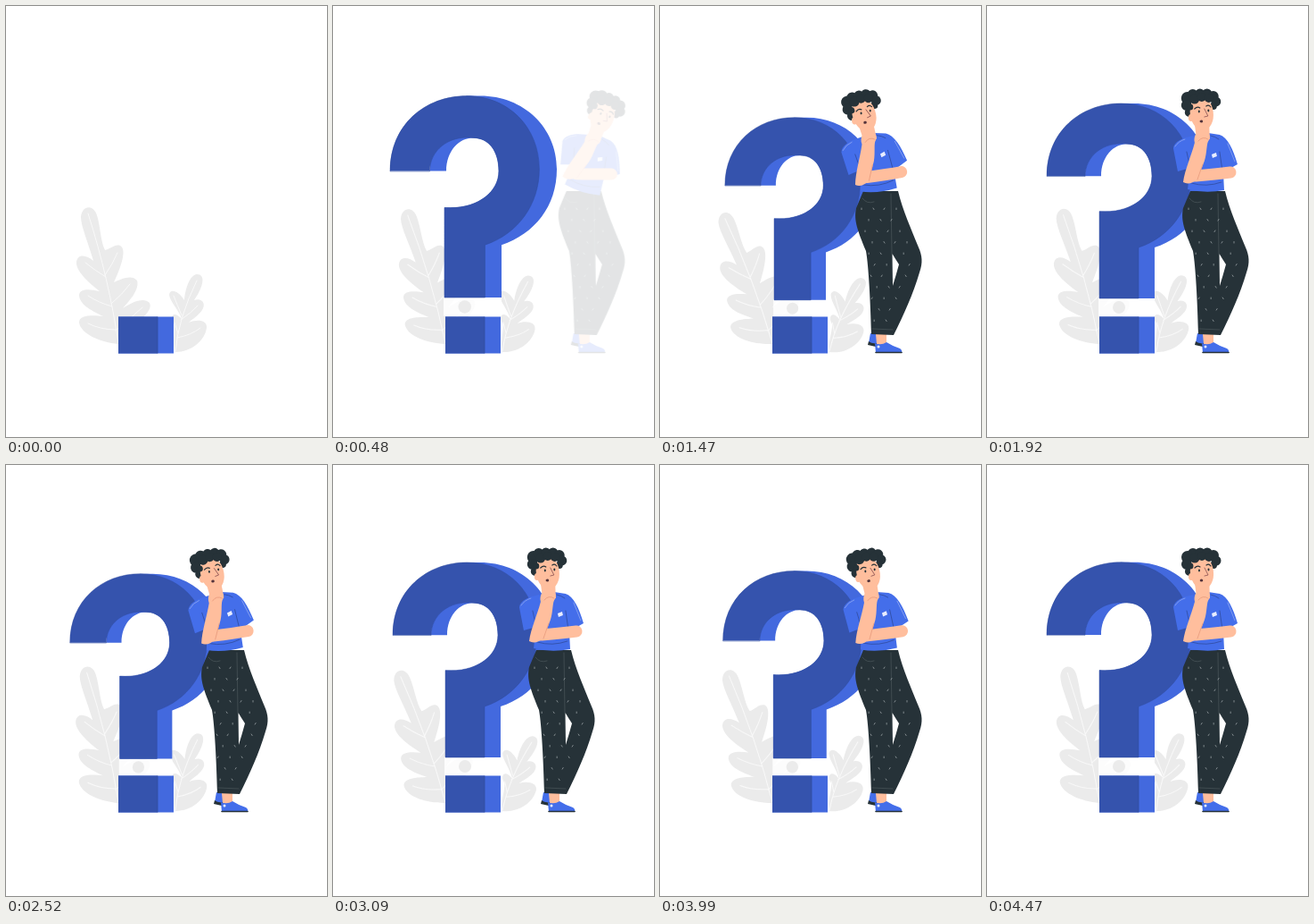
Write an HTML page with a canvas that moves like this. It is 360x482 px and loops after 4.5 s.

```html
<!DOCTYPE html>
<html lang="en">
<head>
<meta charset="utf-8">
<title>Question mark</title>
<style>
html, body { margin: 0; width: 100%; height: 100%; overflow: hidden; background: #fff; }
canvas { display: block; }
</style>
</head>
<body>
<canvas id="stage" width="360" height="482"></canvas>
<script>
const W = 360, H = 482, LOOP = 4500, STEP = 30;
const SWAY = 2340, PULSE = 1170, SETTLED = 885;
const BLUE = '#4369de', FRONT = '#3553ad', SHIRT = '#446eea', DARK = '#263238';
const SKIN = '#ffbe9d', SHADE = '#e79b7c', LEAF = '#ebebeb';
const stage = document.getElementById('stage').getContext('2d');
const layer = document.createElement('canvas');
layer.width = W;
layer.height = H;
const figure = layer.getContext('2d');

const clamp = v => Math.max(0, Math.min(1, v));
const rad = deg => deg * Math.PI / 180;

function fill(c, d, color) {
  c.fillStyle = color;
  c.fill(new Path2D(d));
}

function line(c, d, color, width = 1) {
  c.strokeStyle = color;
  c.lineWidth = width;
  c.lineCap = c.lineJoin = 'round';
  c.stroke(new Path2D(d));
}

function oval(c, x, y, rx, ry, color, turn = 0) {
  c.fillStyle = color;
  c.beginPath();
  c.ellipse(x, y, rx, ry, turn, 0, 7);
  c.fill();
}

function turned(c, x, y, deg, draw) {
  c.save();
  c.translate(x, y);
  c.rotate(rad(deg));
  c.translate(-x, -y);
  draw();
  c.restore();
}

function drawLeftLeaf(c) {
  fill(c, `M126 378 C106 376 84 367 82 354 C82 345 98 346 109 347
    C94 340 82 333 82 323 C83 315 96 317 105 319
    C92 309 78 296 79 286 C81 276 91 279 98 285
    C92 264 84 246 84 236 C85 223 98 221 102 234 C106 247 106 263 111 273
    C117 272 122 266 128 268 C136 272 129 292 121 309
    C130 305 141 300 147 307 C150 317 139 329 131 338
    C141 331 155 325 161 332 C166 342 145 354 127 378 Z`, LEAF);
  line(c, `M126 377 C119 330 108 282 92 232 M123 362 Q106 362 92 355 M119 336 Q104 332 92 324
    M112 303 Q100 296 89 287 M123 363 Q139 350 153 337 M118 333 Q131 322 139 311
    M111 301 Q120 288 125 276`, '#f9f9f9');
}

function drawRightLeaf(c) {
  fill(c, `M190 387 C187 376 190 366 189 356 C182 347 188 340 197 350
    C194 340 184 331 183 323 C184 315 194 319 200 329
    C201 316 206 301 214 300 C224 300 222 313 211 329
    C219 326 225 332 220 340 C215 347 209 350 205 354
    C214 350 226 351 225 360 C223 374 208 387 190 387 Z`, LEAF);
  line(c, `M190 386 Q193 350 214 307 M192 371 Q208 368 218 360
    M196 351 Q208 343 215 335 M197 346 Q192 334 188 324 M193 366 L189 354`, '#f9f9f9');
}

function drawDot(c) {
  c.fillStyle = BLUE;
  c.fillRect(126, 347.5, 62, 41);
  c.fillStyle = FRONT;
  c.fillRect(126, 347.5, 44, 41);
  line(c, 'M170 348 V388', '#304c9f', .8);
}

function drawMark(c) {
  c.fillStyle = 'rgba(255,255,255,.85)';
  c.fillRect(125, 326, 63, 21);
  oval(c, 148, 337, 7, 7, LEAF);
  fill(c, `M110 190 H128 C128 168 142 154 157 154 C174 154 185 168 185 190
    C185 214 160 232 126 229.5 V327 H188 V270 C224 258 248 228 248 188
    C248 143 212 108.7 165 108.7 H150 C125 120 110 150 110 190 Z`, BLUE);
  const face = `M67 190 C67 140 105 108.7 150 108.7 C196 108.7 229 143 229 188
    C229 226 206 258 170 270 V327 H126 V229.5 C160 232 185 214 185 190
    C185 168 174 154 157 154 C130 151 110 168 110 190 Z`;
  fill(c, face, FRONT);
  line(c, face, '#304c9f', .5);
}

function drawLegs(c) {
  fill(c, 'M241 364 H254 V381 H242 Z', SKIN);
  fill(c, 'M236 366 L242 367 L243 378 L234 377 Z', SHIRT);
  fill(c, 'M234 375 Q238 378 243 377 L242 381 L233 379 Z', DARK);
  fill(c, 'M241 377 Q248 380 254 376 Q262 381 269 383 Q272 385 271 388 H242 Z', SHIRT);
  oval(c, 245, 381, 1.5, 1.5, '#e8edff');
  line(c, 'M242 387.5 H271', DARK, 1.6);
  fill(c, `M228 207 H267 C272 228 282 250 290 270 C294 279 295 287 291 298
    C284 322 273 346 262 368 L237 367 C236 330 234 291 231 274
    C222 252 217 240 220 226 Z`, DARK);
  fill(c, 'M260.5 277 Q264 283 268 289 Q265 300 261 313 Z', '#fff');
  line(c, 'M259 210 L260 277 M227 215 Q232 222 240 219 M238 361 L261 362', '#4b565b', .7);
  for (let row = 0; row < 11; row++) {
    const y = 226 + row * 12.5;
    const right = y < 290 ? 268 + (y - 215) * .3 : 290 - (y - 290) * .4;
    const left = y < 274 ? 226 + (y - 226) * .16 : 234 + (y - 274) * .08;
    for (let x = left + row % 2 * 6; x < right - 3; x += 13) {
      if (y > 275 && y < 315 && x > 257 && x < 269) continue;
      const lean = (row + Math.round(x)) % 3 - 1;
      line(c, `M${x} ${y} l${lean} 1.6`, '#a9b1b4', .7);
    }
  }
}

function drawHead(c) {
  const curls = [[225, 103, 7], [224, 111, 6], [227, 119, 5], [231, 99, 6], [239, 98, 5.5],
    [247, 98, 5.5], [254, 101, 6], [257, 107, 5.5], [254, 112, 4]];
  const hair = list => { for (const [x, y, r] of list) oval(c, x, y, r, r, DARK); };
  hair(curls);
  fill(c, 'M232 125 H249 L250 149 Q241 154 235 147 Z', SKIN);
  oval(c, 241, 120, 13, 19, SKIN, -.12);
  hair([[233, 104, 5.5], [241, 102, 5], [249, 103, 5], [228, 113, 3.5]]);
  oval(c, 229, 125, 3, 4, SKIN);
  line(c, 'M233 115 Q236 112 239 114 M246 112 Q249 110 251 113', DARK, 1.2);
  oval(c, 238, 118, 1, 1.4, DARK);
  oval(c, 248.5, 117, 1, 1.4, DARK);
  line(c, 'M244 115 L248 123 L244 124', '#884f50', .8);
  oval(c, 240.5, 129, 1.8, 1.5, '#54333b');
}

function drawUpper(c, tilt) {
  fill(c, `M232 145 C219 147 210 152 209 159 L214 185 L228 181 L225 205
    Q245 210 266 206 L265 186 L281 177 C276 160 270 147 261 144 L248 142 Z`, SHIRT);
  line(c, 'M228 181 L224 163 M264 184 L261 163 M229 198 Q246 203 263 197 M251 145 Q256 146 260 149', '#304c9f', .8);
  line(c, 'M211 157 Q215 151 222 149 M270 154 L278 174', '#8fa7f1', .8);
  turned(c, 241, 145, tilt * .5, () => drawHead(c));
  turned(c, 234, 189, -tilt * .6, () => line(c, 'M273 186 Q257 188 234 190', SKIN, 13));
  fill(c, `M220 197 C222 183 229 168 233 153 C231 144 237 138 243 139
    C248 140 252 145 249 150 C246 153 247 164 244 173 L236 194 Q227 201 220 197 Z`, SKIN);
  line(c, 'M242 177 L236 194 M237 151 Q242 145 248 149', SHADE, .8);
  fill(c, 'M252 166 L257 164 L258 168 L253 170 Z', '#e8edff');
}

// Rises past 1, then settles back.
function overshoot(p) {
  const u = 1 - p, s = 2.08;
  return 1 + s * u * u - (s + 1) * u * u * u;
}

function drawFigure(t, squeeze) {
  const alpha = clamp((t - 450) / 230);
  if (!alpha) return;
  const away = Math.pow(1 - clamp((t - 450) / 120), 3);
  const tilt = 38 * away - 7 * squeeze;
  figure.clearRect(0, 0, W, H);
  drawLegs(figure);
  turned(figure, 245, 207, tilt, () => drawUpper(figure, tilt));
  stage.globalAlpha = alpha;
  stage.drawImage(layer, 80 * away, 0);
  stage.globalAlpha = 1;
}

function draw(t) {
  stage.fillStyle = '#fff';
  stage.fillRect(0, 0, W, H);

  const sway = 4.5 * (1 - Math.cos(2 * Math.PI * t / SWAY));
  turned(stage, 126, 378, -sway, () => drawLeftLeaf(stage));
  turned(stage, 190, 387, sway, () => drawRightLeaf(stage));

  const squeeze = t < SETTLED ? 0 : Math.sin(Math.PI * (t - SETTLED) / PULSE) ** 4;
  const scale = overshoot(clamp((t - 262) / (SETTLED - 262))) - .065 * squeeze;
  if (scale > 0) {
    stage.save();
    stage.translate(157, 355);
    stage.scale(scale, scale);
    stage.translate(-157, -355);
    drawMark(stage);
    stage.restore();
  }
  drawDot(stage);
  drawFigure(t, squeeze);
}

const start = performance.now();
function tick() {
  const t = (performance.now() - start) % LOOP;
  draw(Math.floor(t / STEP) * STEP);
  requestAnimationFrame(tick);
}
tick();
</script>
</body>
</html>
```
